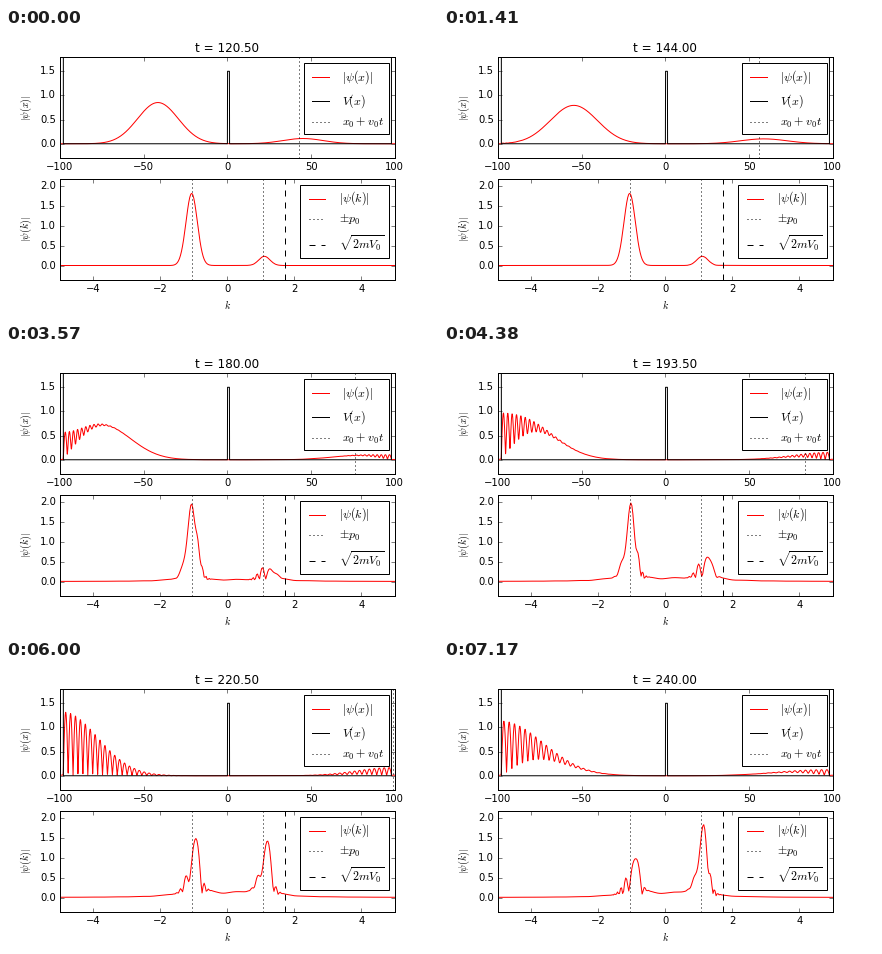
Animation of 432x288 px, one loop 7.2 s. Source, as a matplotlib script:

```python
"""Wave packet meeting a square barrier, split-step Fourier method."""
import numpy as np
import matplotlib.pyplot as plt
from matplotlib.animation import FuncAnimation
from matplotlib.lines import Line2D
from matplotlib.patches import Rectangle
from matplotlib.transforms import Affine2D

W, H, DPI = 432, 288, 72
FRAMES, INTERVAL = 240, 30
DT, STEPS = 0.01, 50
LEAD = 240          # blocks of STEPS computed before the loop starts

plt.style.use("classic")
plt.rcParams.update({
    "font.family": "DejaVu Sans",
    "font.size": 10,
    "figure.dpi": DPI,
    "savefig.dpi": "figure",
    "figure.facecolor": "white",
    "savefig.facecolor": "white",
})

# Physics, with hbar = 1
m, V0 = 1.9, 1.5
N, dx = 2 ** 11, 0.1
x = dx * (np.arange(N) - 0.5 * N)
k_min = -28
k = k_min + 2 * np.pi / (N * dx) * np.arange(N)

L = 1 / np.sqrt(2 * m * V0)
x0 = -60 * L
p0 = np.sqrt(2 * m * 0.2 * V0)
width = np.sqrt(40) / p0

V = np.where((x > 0) & (x <= 3 * L), V0, 0.0)
V[(x < -98) | (x > 98)] = 1e6

k_norm = dx / np.sqrt(2 * np.pi)


def simulate():
    """Return the starting |psi(k)| and the |psi(x)|, |psi(k)| of each frame."""
    half = np.exp(-0.5j * V * DT)
    full = half * half
    kick = np.exp(-0.5j / m * k * k * DT)
    psi = (width * np.sqrt(np.pi)) ** -0.5 * np.exp(
        -0.5 * ((x - x0) / width) ** 2 + 1j * x * (p0 - k_min))
    start = k_norm * abs(np.fft.fft(psi))
    states = []
    for block in range(LEAD + FRAMES):
        psi *= half
        for step in range(STEPS):
            psi_k = np.fft.fft(psi)
            psi_k *= kick
            psi = np.fft.ifft(psi_k)
            psi *= full if step < STEPS - 1 else half
        if block >= LEAD:
            states.append((abs(psi), k_norm * abs(np.fft.fft(psi))))
    return start, states


start_k, states = simulate()


def padded(lo, hi):
    pad = 0.2 * (hi - lo)
    return lo - pad, hi + pad


fig = plt.figure(figsize=(W / DPI, H / DPI), dpi=DPI)
fig.subplots_adjust(left=0.125, right=0.9, bottom=0.125, top=0.9,
                    hspace=0.2, wspace=0.2)
# Pixel coordinates measured from the top left corner
px = Affine2D().scale(1 / W, -1 / H).translate(0, 1) + fig.transFigure


def label(px_x, px_y, text, size=10, **kw):
    fig.text(px_x, px_y, text, size=size, transform=px, **kw)


def legend(left, top, right, bottom, rows):
    fig.add_artist(Rectangle((left, top), right - left, bottom - top,
                             fc="w", ec="k", lw=1, transform=px))
    for y, base, text, color, style in rows:
        fig.add_artist(Line2D([left + 8.4, left + 25.2], [y, y], color=color,
                              ls=style, lw=1, transform=px))
        label(left + 38.4, base, text, 12, va="baseline")


ax1 = fig.add_subplot(211, xlim=(-100, 100), ylim=padded(0, V0))
psi_x_line, = ax1.plot([], [], c="r")
ax1.plot(x, V, c="k")
center = ax1.axvline(0, c="k", ls=":")
title = ax1.set_title("")
ax1.set_xticks(range(-100, 101, 50))
ax1.set_yticks(np.arange(0, 1.6, 0.5))

ax2 = fig.add_subplot(212, xlim=(-5, 5),
                      ylim=padded(start_k.min(), start_k.max()))
psi_k_line, = ax2.plot([], [], c="r")
for p in (-p0, p0):
    ax2.axvline(p, c="k", ls=":")
ax2.axvline(np.sqrt(2 * V0), c="k", ls="--")
ax2.set_xticks(range(-4, 5, 2))
ax2.set_yticks(np.arange(0, 2.1, 0.5))

side = dict(rotation=90, ha="center", va="center")
label(20.5, 80, r"$|\psi(x)|$", **side)
label(20.5, 201.5, r"$|\psi(k)|$", **side)
label(221.5, 281, "$k$", ha="center", va="baseline")

legend(297.6, 34.8, 382.8, 105.8, [
    (48.5, 53, r"$|\psi(x)|$", "r", "-"),
    (72.5, 77, r"$V(x)$", "k", "-"),
    (93.5, 98, r"$x_0 + v_0t$", "k", ":"),
])
legend(294.2, 156.5, 382.8, 229.8, [
    (170.5, 174, r"$|\psi(k)|$", "r", "-"),
    (190.5, 195, r"$\pm p_0$", "k", ":"),
    (216.5, 221, r"$\sqrt{2mV_0}$", "k", "--"),
])


def draw(i):
    t = (LEAD + 1 + i) * STEPS * DT
    amp_x, amp_k = states[i]
    psi_x_line.set_data(x, 4 * amp_x)
    psi_k_line.set_data(k, amp_k)
    center.set_xdata([x0 + t * p0 / m] * 2)
    title.set_text(f"t = {t:.2f}")
    return psi_x_line, psi_k_line, center, title


anim = FuncAnimation(fig, draw, frames=FRAMES, interval=INTERVAL,
                     repeat=True, repeat_delay=0, blit=False)
plt.show()
```
